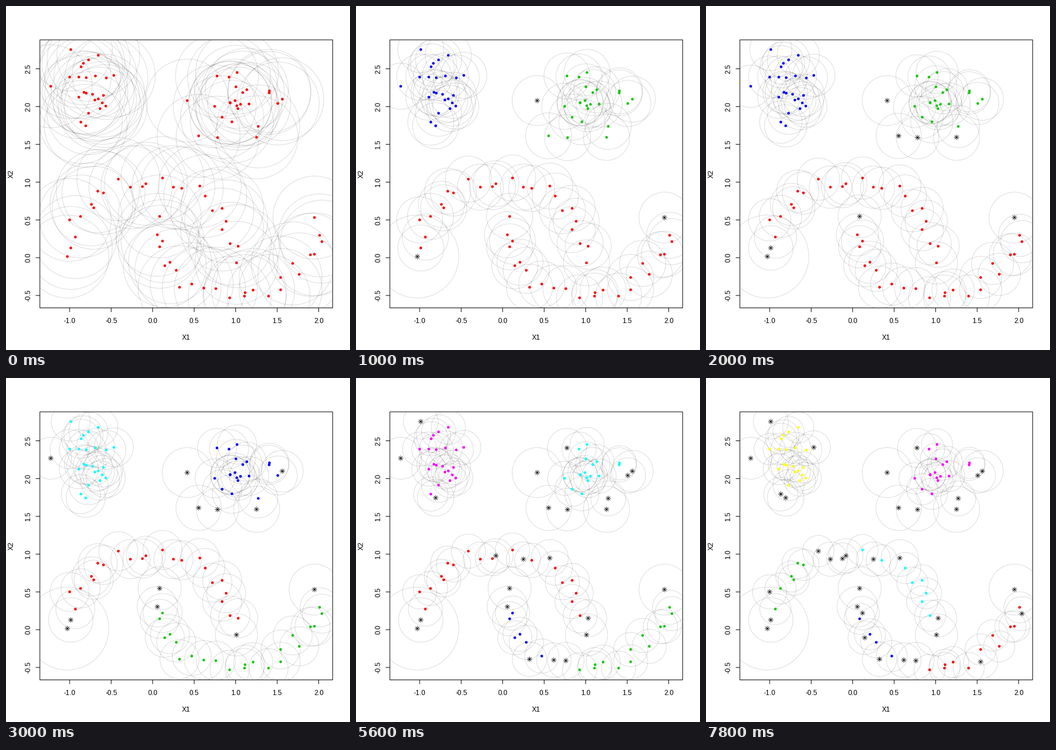
Write a matplotlib script that moves like this. It is 600 by 600 pixels and loops after 8000 ms.

```python
import numpy as np
import matplotlib.pyplot as plt
from matplotlib.animation import FuncAnimation
from matplotlib.collections import LineCollection, PolyCollection
from matplotlib.patches import Rectangle

SIZE, DPI, FRAMES, STEP = 600, 100, 40, 200
PX = 72 / DPI                                    # one pixel in points
LEFT, TOP, RIGHT, BOTTOM = 59.04, 59.04, 569.76, 526.56
ORIGIN = np.array([255.8, 439.0])                # pixel of data (0, 0)
UNIT = np.array([144.8, -131.8])                 # pixels per data unit
RADIUS = 89.5                                    # circle pixels per unit of eps
NEIGHBOURS = 4
PALETTE = ["#ff0000", "#14c80a", "#0000ff", "#00ffff", "#ff00ff", "#ffff00"]

# The data set, as stage positions: two interleaved moons and two blobs.
MOONS = [
    (196, 302), (366, 493), (390, 509), (417, 500), (416, 506), (431, 495.5),
    (458, 506), (479, 495), (479, 473.5), (500, 449), (511.5, 468),
    (531, 434), (538, 433), (547, 400), (551, 411), (538, 369), (107, 437),
    (113, 422), (121, 403), (111, 373), (130, 367), (149, 346), (153, 352),
    (160, 323), (170, 326), (217, 316), (238, 315), (268, 367), (264, 399),
    (273, 410), (268, 420), (277, 453), (286, 447), (297, 461),
    (302.7, 490.5), (324, 485), (345, 492), (244, 310), (273, 300),
    (292, 316), (306.5, 318), (338, 314), (347.5, 331.5), (360, 357),
    (377, 353), (384, 375.5), (377, 390), (391, 414.5), (405, 419),
    (402, 448)]
BLOBS = [
    (368, 122), (389, 124), (403, 116), (316, 165), (364, 175), (377, 194),
    (394, 202), (336, 226.5), (369, 229.5), (437, 229), (440, 210),
    (391, 169), (391, 168.5), (399.5, 165), (402.5, 174), (404.5, 179),
    (409, 171.5), (413, 151), (420, 146), (424, 171), (401, 141),
    (459.5, 148), (459, 151.5), (474, 170), (482, 162.5), (113, 76),
    (161, 86), (144, 94), (135, 100), (131, 106), (111, 124), (127, 124),
    (140, 125), (156, 122), (175, 125.5), (188, 121), (78, 140), (127, 159),
    (136, 150.5), (140, 152), (151, 154), (155, 164), (161, 162), (170, 156),
    (168, 169), (164, 179), (174, 174.5), (144, 187), (130.5, 202.5),
    (139, 209)]

xy = np.array(MOONS + BLOBS, dtype=float)
gaps = (xy[:, None] - xy) / UNIT
dist = np.sqrt((gaps ** 2).sum(axis=2))
core = np.sort(dist, axis=1)[:, NEIGHBOURS]
reach = np.maximum(dist, np.maximum(core[:, None], core))


def tree_heights(d):
    """Edge lengths of the minimum spanning tree, longest first."""
    best, outside = d[0].copy(), np.ones(len(d), bool)
    outside[0] = False
    heights = []
    while outside.any():
        i = np.argmin(np.where(outside, best, np.inf))
        heights.append(best[i])
        outside[i] = False
        best = np.minimum(best, d[i])
    return np.sort(heights)[::-1]


def clusters(eps):
    """Density clusters numbered by first member; -1 is noise."""
    label = np.full(len(xy), -1)
    linked = reach <= eps
    for i in np.flatnonzero(core <= eps):
        if label[i] >= 0:
            continue
        group, stack = label.max() + 1, [i]
        label[i] = group
        while stack:
            near = np.flatnonzero(linked[stack.pop()] & (label < 0))
            label[near] = group
            stack.extend(near)
    return label


def build_states():
    eps_values = tree_heights(reach)[:FRAMES] + 1e-9
    radii = np.full(len(xy), eps_values[0])
    states = []
    for eps in eps_values:
        label = clusters(eps)
        # Circles hold still until the first point drops out.
        if (label < 0).any():
            radii = np.where(label < 0, radii, eps)
        states.append((label, RADIUS * radii))
    return states


states = build_states()

turn = np.linspace(0, 2 * np.pi, 90, endpoint=False)
RING = np.column_stack([np.cos(turn), np.sin(turn)])
ARMS = [np.array([(-x, -y), (x, y)]) for x, y in
        [(4.6, 0), (0, 4.6), (3.25, 3.25), (3.25, -3.25)]]

fig = plt.figure(figsize=(SIZE / DPI, SIZE / DPI), dpi=DPI, facecolor="white")
ax = fig.add_axes([0, 0, 1, 1])
ax.set_xlim(0, SIZE)
ax.set_ylim(SIZE, 0)
ax.axis("off")


def line(x, y):
    ax.plot(x, y, color="black", lw=PX, solid_capstyle="butt", zorder=4,
            snap=False)


def text(x, y, s, rotation=0):
    ax.text(x, y, s, rotation=rotation, rotation_mode="anchor",
            ha="center", va="baseline", family="Liberation Sans",
            fontsize=12 * PX, color="black")


def draw_axes():
    ax.add_patch(Rectangle((LEFT, TOP), RIGHT - LEFT, BOTTOM - TOP,
                           fill=False, ec="black", lw=PX, zorder=4,
                           snap=False))
    for v in np.arange(-1, 2.1, 0.5):
        x = ORIGIN[0] + UNIT[0] * v
        line([x, x], [BOTTOM, BOTTOM + 7.2])
        text(x, 553, f"{v:.1f}")
    for v in np.arange(-0.5, 2.6, 0.5):
        y = ORIGIN[1] + UNIT[1] * v
        line([LEFT - 7.2, LEFT], [y, y])
        text(42.2, y, f"{v:.1f}", 90)
    text((LEFT + RIGHT) / 2, 582, "X1")
    text(13.2, (TOP + BOTTOM) / 2, "X2", 90)


draw_axes()
circles = PolyCollection([], facecolors="none", edgecolors=(0, 0, 0, 0.16),
                         linewidths=0.85 * PX, zorder=1)
dots = PolyCollection([], linewidths=0, zorder=2)
stars = LineCollection([], colors="black", linewidths=0.8 * PX, zorder=3)
inside = Rectangle((LEFT, TOP), RIGHT - LEFT, BOTTOM - TOP,
                   transform=ax.transData)
for part in (circles, dots, stars):
    ax.add_collection(part, autolim=False)
    part.set_clip_path(inside)
    part.set_snap(False)


def draw(k):
    label, radii = states[k]
    noise = label < 0
    circles.set_verts(list(xy[:, None] + radii[:, None, None] * RING))
    dots.set_verts(list(xy[~noise][:, None] + 2.35 * RING))
    dots.set_facecolors([PALETTE[c % len(PALETTE)] for c in label[~noise]])
    stars.set_segments([p + arm for p in xy[noise] for arm in ARMS])
    return circles, dots, stars


anim = FuncAnimation(fig, draw, frames=FRAMES, interval=STEP, repeat=True,
                     repeat_delay=0, blit=False)
plt.show()
```
